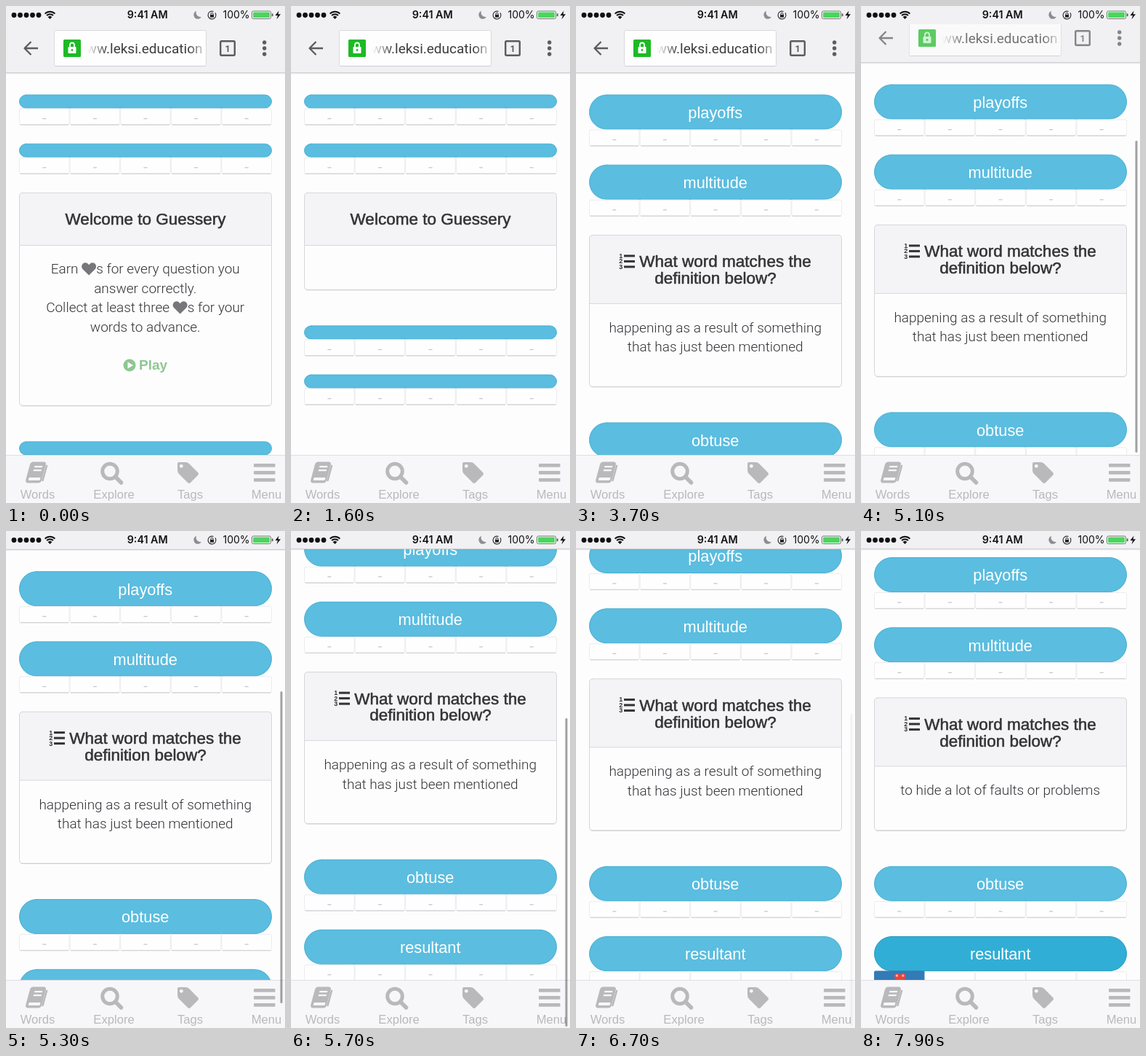
Write an HTML page with a canvas that moves like this. It is 384x682 px and loops after 8 s.

```html
<!DOCTYPE html>
<html lang="en">
<head>
<meta charset="utf-8">
<title>Word quiz</title>
<style>
html, body { margin: 0; width: 100%; height: 100%; overflow: hidden; background: #fefdfe; }
canvas { display: block; width: 384px; height: 682px; }
</style>
</head>
<body>
<canvas id="stage"></canvas>
<script>
const W = 384, H = 682, LOOP = 8000, STEP = 100;
const LEFT = 18, WIDTH = 348, MID = 192, STATUS_H = 25, BAR_H = 67;
const SANS = '"Liberation Sans", Arial, sans-serif';
const ROBOTO = 'Roboto, sans-serif';
const INTER = 'Inter, sans-serif';
const INK = '#333236', ICON = '#b9b8bb', CHROME = '#f1f0f3';

const canvas = document.getElementById('stage');
const ctx = canvas.getContext('2d');
const dpr = window.devicePixelRatio || 1;
canvas.width = W * dpr;
canvas.height = H * dpr;

const clamp = (v, lo = 0, hi = 1) => Math.min(hi, Math.max(lo, v));
const ramp = (t, from, to) => clamp((t - from) / (to - from));

function track(points, t) {
  if (t <= points[0][0]) return points[0][1];
  for (let i = 1; i < points.length; i++) {
    const [t0, v0] = points[i - 1], [t1, v1] = points[i];
    if (t <= t1) return v0 + (v1 - v0) * (t - t0) / (t1 - t0);
  }
  return points[points.length - 1][1];
}

function text(str, x, y, font, color, align = 'center') {
  ctx.font = font;
  ctx.fillStyle = color;
  ctx.textAlign = align;
  ctx.fillText(str, x, y);
}

// Regular weight thickened by a hairline to a medium weight.
function heading(str, x, y) {
  text(str, x, y, '22.5px ' + SANS, INK);
  ctx.strokeStyle = INK;
  ctx.lineWidth = .55;
  ctx.lineJoin = 'round';
  ctx.strokeText(str, x, y);
}

function rect(x, y, w, h, color) {
  ctx.fillStyle = color;
  ctx.fillRect(x, y, w, h);
}

function roundBox(x, y, w, h, r, fill, stroke, line = 1) {
  ctx.beginPath();
  ctx.roundRect(x, y, w, h, r);
  if (fill) { ctx.fillStyle = fill; ctx.fill(); }
  if (stroke) { ctx.strokeStyle = stroke; ctx.lineWidth = line; ctx.stroke(); }
}

function disc(x, y, r, color) {
  ctx.beginPath();
  ctx.arc(x, y, r, 0, 7);
  ctx.fillStyle = color;
  ctx.fill();
}

function poly(points, color) {
  ctx.beginPath();
  points.forEach(([x, y]) => ctx.lineTo(x, y));
  ctx.closePath();
  ctx.fillStyle = color;
  ctx.fill();
}

function stroke(d, color, width, cap = 'butt') {
  ctx.strokeStyle = color;
  ctx.lineWidth = width;
  ctx.lineCap = cap;
  ctx.stroke(new Path2D(d));
}

const HEART = new Path2D('M0 8.5 L-8.4 .4 C-13 -5 -6.5 -11.5 -1.6 -7.4 L0 -5.6 L1.6 -7.4 C6.5 -11.5 13 -5 8.4 .4 Z');
function heart(x, y, size, color) {
  ctx.save();
  ctx.translate(x, y);
  ctx.scale(size / 20, size / 20);
  ctx.fillStyle = color;
  ctx.fill(HEART);
  ctx.restore();
}

// Centred line in which every ♥ is a drawn icon.
function heartLine(str, y) {
  const font = '300 19px ' + ROBOTO, size = 20;
  ctx.font = font;
  const parts = str.split('♥');
  const widths = parts.map(p => ctx.measureText(p).width);
  const total = widths.reduce((a, b) => a + b) + size * (parts.length - 1);
  let x = MID - .3 - total / 2;
  parts.forEach((part, i) => {
    if (i) { heart(x + size / 2, y - 6.5, size, '#77767a'); x += size; }
    text(part, x, y, font, INK, 'left');
    x += widths[i];
  });
}

const SCROLL = [[5000, 0], [5100, 14], [5200, 38], [5300, 66.3], [5400, 88], [5500, 104],
  [5600, 115], [5700, 120.8], [5850, 121.5], [6000, 118], [6200, 113], [6400, 111.5]];

function stateAt(t) {
  const s = { mode: t < 1500 ? 'welcome' : t < 2200 ? 'empty' : 'quiz' };
  s.full = s.mode === 'quiz';
  s.answered = t >= 6900;
  s.scored = t >= 7000;
  s.second = t >= 7300;
  s.alpha = s.second ? ramp(t, 7400, 7700) : 1 - ramp(t, 6900, 7300);
  s.head = s.full ? 95 : 73;
  s.body = s.mode === 'welcome' ? 220 : s.mode === 'empty' ? 61 : !s.second ? 114 : t < 7500 ? 61 : 88;
  s.scroll = track(SCROLL, t) - (s.second ? 114 - s.body : 0);
  s.collapse = Math.min(BAR_H, track(SCROLL, t));
  s.thumb = t < 5100 ? 0 : 1 - ramp(t, 6300, 6750);
  return s;
}

function cells(y, scored) {
  const w = WIDTH / 5;
  for (let i = 0; i < 5; i++) {
    const x = LEFT + i * w;
    roundBox(x + .5, y, w - 1, 22, 2, '#fefefe', '#ecebee');
    rect(x + 1.5, y + 21.3, w - 3, 1.4, '#d5d4d8');
    if (scored && i === 0) {
      roundBox(x, y - 1, w, 23, 2, '#337ab7');
      heart(x + w / 2 + 1, y + 9, 16, '#e8453c');
      [-3.5, 5].forEach(dx => disc(x + w / 2 + dx, y + 5.5, 1.6, '#f9c4c0'));
    } else {
      rect(x + w / 2 - 2.5, y + 13, 5, 1.2, '#c4c3c7');
    }
  }
}

function group(y, word, s, chosen) {
  const h = s.full ? 48 : 19;
  const hot = chosen && s.answered;
  roundBox(LEFT + .5, y + .5, WIDTH - 1, h - 1, h / 2,
    hot ? '#31aed6' : '#5bbddf', hot ? '#269abc' : '#46b0d3');
  if (s.full) text(word, MID - .3, y + 32.3, '21.8px ' + SANS, '#fff');
  cells(y + h + .5, chosen && s.scored);
  return y + h + 48.2;
}

function listIcon(x, y) {
  for (let i = 0; i < 3; i++) {
    const cy = y + (i - 1) * 7.5;
    rect(x + 7, cy - 1.5, 15, 3, INK);
    text(String(i + 1), x + 2.7, cy + 3, 'bold 9px ' + SANS, INK);
  }
}

function welcomeBody(y) {
  ['Earn ♥s for every question you', 'answer correctly.',
    'Collect at least three ♥s for your', 'words to advance.']
    .forEach((line, i) => heartLine(line, y + 38.5 + i * 26.5));
  const green = '#8dc891';
  disc(170, y + 164, 8.5, green);
  poly([[167.5, y + 159.5], [175, y + 164], [167.5, y + 168.5]], '#fefdfe');
  text('Play', 183, y + 170.5, 'bold 19px ' + SANS, green, 'left');
}

function card(y, s) {
  const h = s.head + s.body;
  roundBox(LEFT + .5, y + .5, WIDTH - 1, h, 4, '#fefdfe');
  roundBox(LEFT + .5, y + .5, WIDTH - 1, s.head - 1, [4, 4, 0, 0], '#f4f3f5');
  rect(LEFT, y + s.head - 1, WIDTH, 1, '#d9d8dc');
  roundBox(LEFT + .5, y + .5, WIDTH - 1, h - 1, 4, null, '#d6d5d9');
  rect(LEFT + 3, y + h - .6, WIDTH - 6, 1, '#d0cfd3');
  const bodyTop = y + s.head;
  if (!s.full) {
    heading('Welcome to Guessery', MID, y + 44.5);
    if (s.mode === 'welcome') welcomeBody(bodyTop);
    return y + h;
  }
  listIcon(59, y + 36.5);
  heading('What word matches the', 205.5, y + 44.5);
  heading('definition below?', MID, y + 67.3);
  const lines = s.second ? ['to hide a lot of faults or problems']
    : ['happening as a result of something', 'that has just been mentioned'];
  ctx.globalAlpha = s.alpha;
  lines.forEach((line, i) => heartLine(line, bodyTop + 39 + i * 26.5));
  ctx.globalAlpha = 1;
  return y + h;
}

function page(s) {
  let y = 121.5 - s.scroll;
  y = group(y, 'playoffs', s);
  y = group(y, 'multitude', s);
  y = card(y, s) + 48.5;
  y = group(y, 'obtuse', s);
  group(y, 'resultant', s, true);
}

function addressBar() {
  const dark = '#5c5b5f';
  stroke('M44 58 H26 M34.5 49 L25.5 58 L34.5 67', dark, 2.3);
  roundBox(66.5, 33.5, 209, 49, 2, '#fefefe', '#d9d8dc');
  rect(68, 82, 206, 1, '#cfced2');
  roundBox(79, 46, 24, 24, 1.5, '#1dba25');
  roundBox(85.5, 56, 11, 9, 1, '#fff');
  stroke('M88 56 V53.5 A3 3 0 0 1 94 53.5 V56', '#fff', 1.8);
  disc(91, 60.5, 1.4, '#1dba25');

  ctx.save();
  ctx.beginPath();
  ctx.rect(112, 36, 158, 44);
  ctx.clip();
  const fade = ctx.createLinearGradient(112, 0, 270, 0);
  [[0, 0], [.18, 1], [.88, 1], [1, .3]].forEach(([p, a]) => fade.addColorStop(p, `rgba(60,59,63,${a})`));
  text('www.leksi.education', 270.5, 65, '19px ' + ROBOTO, fade, 'right');
  ctx.restore();

  roundBox(295.2, 48.2, 19.6, 19.6, 1.5, null, dark, 2.4);
  text('1', 305, 62.5, 'bold 12.5px ' + ROBOTO, dark);
  [50, 58, 66].forEach(y => disc(355.7, y, 2.7, dark));
}

function statusBar() {
  for (let i = 0; i < 5; i++) disc(11 + i * 8.5, 12.5, 3.4, '#111');
  poly([[57.5, 15], [60.5, 18], [63.5, 15], [60.5, 13.6]], '#111');
  stroke('M56 13 A6.5 6.5 0 0 1 65 13 M53.6 10.6 A9.8 9.8 0 0 1 67.4 10.6', '#111', 1.9);
  text('9:41 AM', 194.7, 17.3, '600 14.3px ' + INTER, '#111');
  ctx.fillStyle = '#8d8c90';
  ctx.fill(new Path2D('M262 6.8 A5.7 5.7 0 1 0 269 14.8 A6 6 0 0 1 262 6.8 Z'));
  ctx.beginPath();
  ctx.arc(283.5, 12.5, 5.4, -.6, 5.1);
  ctx.strokeStyle = '#333';
  ctx.lineWidth = 1.2;
  ctx.stroke();
  rect(281, 12, 5, 3.6, '#222');
  stroke('M282 12 V10.8 A1.5 1.5 0 0 1 285 10.8 V12', '#222', 1);
  text('100%', 298.5, 17.3, '400 14px ' + INTER, '#111', 'left');
  roundBox(338.5, 7, 26, 10.5, 2, '#fefefe', '#5c6b5e', .9);
  roundBox(340, 8.5, 23, 7.5, 1, '#4cd55f');
  roundBox(365.8, 10.2, 1.8, 4, 1, '#555');
  poly([[375.5, 6.5], [370.5, 13], [374, 13], [372.5, 18.3], [378, 11.3], [374.5, 11.3]], '#111');
}

function header(s) {
  const bottom = STATUS_H + BAR_H - s.collapse;
  rect(0, 0, W, bottom, CHROME);
  rect(0, bottom - .8, W, 1, '#c9c8cc');
  rect(0, bottom + .2, W, 1.2, 'rgba(0,0,0,.06)');
  if (s.collapse < BAR_H) {
    ctx.save();
    ctx.beginPath();
    ctx.rect(0, STATUS_H, W, BAR_H);
    ctx.clip();
    ctx.translate(0, -s.collapse);
    ctx.globalAlpha = clamp(1 - s.collapse / 50);
    addressBar();
    ctx.restore();
  }
  statusBar();
}

function bookIcon() {
  ctx.save();
  ctx.transform(1, 0, -.27, 1, 41, 640);
  roundBox(-11, -14.5, 22, 29, 4, ICON);
  rect(-4, -9, 11, 2.2, '#f7f6f9');
  rect(-4, -4, 11, 2.2, '#f7f6f9');
  roundBox(-7.5, 7, 16, 4, 1, '#f7f6f9');
  ctx.restore();
  stroke('M56 631 L50.5 651', ICON, 2.5, 'round');
}

function tagIcon() {
  ctx.fillStyle = ICON;
  ctx.fill(new Path2D('M236 628 Q236 626 238 626 H247 Q250 626 252 628 L264 640 Q266 642 264 644 L254 654 Q252 656 250 654 L238 642 Q236 640 236 637 Z'));
  disc(241.3, 631.3, 2.4, '#f7f6f9');
}

function tabBar() {
  rect(0, 616, W, 66, '#f7f6f9');
  rect(0, 616, W, 1, '#dfdee2');
  bookIcon();
  ctx.beginPath();
  ctx.arc(143, 638.5, 10.3, 0, 7);
  ctx.strokeStyle = ICON;
  ctx.lineWidth = 5;
  ctx.stroke();
  stroke('M150.5 646 L158.5 654', ICON, 5.5, 'round');
  tagIcon();
  [628, 638, 648].forEach(y => roundBox(341, y, 29.5, 4.8, 1, ICON));
  ['Words', 'Explore', 'Tags', 'Menu']
    .forEach((label, i) => text(label, 43.5 + i * 105, 676, '16.6px ' + SANS, ICON));
}

function scrollThumb(s) {
  if (!s.thumb) return;
  const top = 220 + (s.scroll - 66.3) * .673;
  const bottom = Math.min(680, top + 428);
  roundBox(377.5, top, 3, bottom - top, 1.5, `rgba(0,0,0,${.36 * s.thumb})`);
}

function render(now) {
  const t = Math.floor((now % LOOP) / STEP) * STEP;
  const s = stateAt(t);
  ctx.setTransform(dpr, 0, 0, dpr, 0, 0);
  rect(0, 0, W, H, '#fefdfe');
  page(s);
  header(s);
  tabBar();
  scrollThumb(s);
}

const start = performance.now();
function frame() {
  render(performance.now() - start);
  requestAnimationFrame(frame);
}
frame();
</script>
</body>
</html>
```
